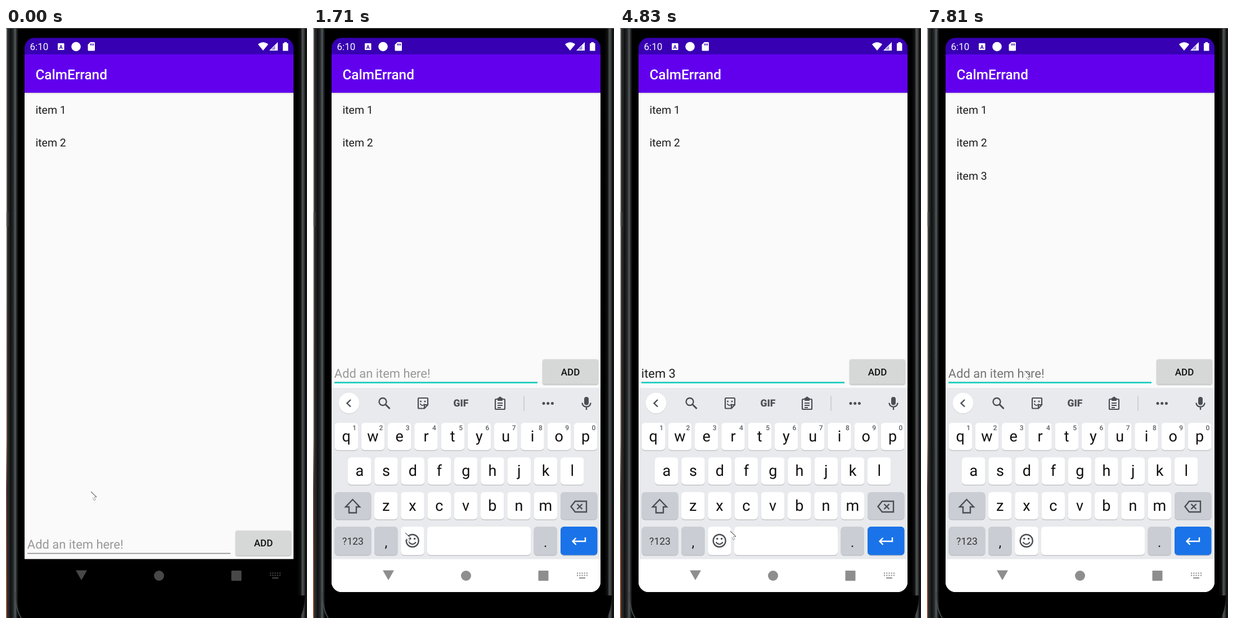
Write an HTML page that moves like this. It is 535 by 1046 pixels and loops after 8000 ms.

```html
<!DOCTYPE html>
<html lang="en">
<head>
<meta charset="utf-8">
<title>To-do list</title>
<style>
  html, body { margin: 0; width: 100%; height: 100%; overflow: hidden; background: #000; }
  svg { display: block; width: 100vw; height: 100vh; font-family: Roboto, sans-serif; }
  text { white-space: pre; text-rendering: geometricPrecision; }
  .mid { text-anchor: middle; }
  .line { fill: none; stroke: #4b4e53; stroke-width: 2.4; }
</style>
</head>
<body>
<svg viewBox="0 0 535 1046">
  <defs>
    <linearGradient id="left">
      <stop offset="0" stop-color="#141516"/><stop offset=".17" stop-color="#2b2e2f"/>
      <stop offset=".26" stop-color="#101112"/><stop offset=".38" stop-color="#1b1d1e"/>
      <stop offset=".48" stop-color="#303435"/><stop offset=".56" stop-color="#555c5e"/>
      <stop offset=".66" stop-color="#202324"/><stop offset=".76" stop-color="#000"/>
    </linearGradient>
    <linearGradient id="right">
      <stop offset="0" stop-color="#000"/><stop offset=".35" stop-color="#111"/>
      <stop offset=".5" stop-color="#4c5051"/><stop offset=".7" stop-color="#3a3d3e"/>
      <stop offset=".82" stop-color="#0c0c0d"/><stop offset="1" stop-color="#1c1c1c"/>
    </linearGradient>
    <linearGradient id="desk" x2="0" y2="1">
      <stop offset="0" stop-color="#a8a6a5"/><stop offset=".35" stop-color="#b9aaa2"/>
      <stop offset=".7" stop-color="#c0a08e"/><stop offset=".78" stop-color="#6d4a3e"/>
      <stop offset="1" stop-color="#a9583a"/>
    </linearGradient>
    <linearGradient id="drop" x2="0" y2="1">
      <stop offset="0" stop-opacity=".1"/><stop offset="1" stop-opacity="0"/>
    </linearGradient>
    <clipPath id="screen"><rect x="33" y="17.500" width="478" height="982.600" rx="18"/></clipPath>
  </defs>

  <rect width="535" height="1046"/>
  <rect width="29" height="1046" fill="url(#left)"/>
  <rect width="2" height="1046" fill="url(#desk)"/>
  <rect x="1.500" y="326" width="3" height="26" rx="1" fill="#3a3c3d"/>
  <rect x="518" width="17" height="1046" fill="url(#right)"/>
  <path d="M21 1000C22 1020 24 1034 33 1046H522C528 1036 531 1022 531 1006H518V1000Z"/>
  <path d="M16 1000C17 1022 20 1036 27 1046" fill="none" stroke="#43484a" stroke-width="2"/>
  <path d="M0 .5H535" stroke="#55585a"/>

  <g clip-path="url(#screen)">
    <rect x="33" y="17" width="478" height="30" fill="#3700b3"/>
    <rect x="33" y="46.700" width="478" height="68.200" fill="#6200ee"/>
    <rect x="33" y="114.850" width="478" height="826.850" fill="#fafafa"/>
    <rect x="33" y="114.850" width="478" height="3.500" fill="url(#drop)"/>
    <g fill="#fff">
      <text x="42.500" y="39" font-size="17">6:10</text>
      <rect x="92" y="27" width="11.500" height="12" rx="1"/>
      <text x="97.700" y="36.500" font-size="9.500" font-weight="700" fill="#3700b3" class="mid">A</text>
      <circle cx="124.500" cy="33" r="8.300"/>
      <path d="M150 25H156.500Q158 25 158 26.500V39Q158 40.500 156.500 40.500H147Q145.500 40.500 145.500 39V29.500Z"/>
      <path d="M150.500 27.500V31M153 27.500V31M155.500 27.500V31" stroke="#3700b3" stroke-width="1.300"/>
      <path d="M457 40L448 29Q457 21.500 466 29Z"/>
      <path d="M483 25V40H468Z"/>
      <path d="M478.500 31V38.500H471Z" fill="#3700b3" opacity=".45"/>
      <path d="M494.500 25H499V27H501.500V40.500H492V27H494.500Z"/>
      <text x="52.470" y="90.700" font-size="24.340" font-weight="500">CalmErrand</text>
    </g>
    <g font-size="19.470" fill="#1d1d1d">
      <text x="52.470" y="152">item 1</text>
      <text x="52.470" y="210.400">item 2</text>
      <text x="52.470" y="268.800" id="added">item 3</text>
    </g>

    <g id="entry">
      <text id="value" y="923"></text>
      <path id="compose" stroke="#222" stroke-width="1.400"/>
      <path d="M38 931.500H399" stroke="#858585" stroke-width="1.300"/>
      <path id="focus" d="M38 932.200H399" stroke="#12d2c3" stroke-width="2.500"/>
      <rect id="caret" y="899.500" width="2.700" height="29" fill="#12d2c3"/>
      <rect id="button" x="408.500" y="891" width="98" height="44" rx="2.500"/>
      <text x="457.500" y="919.400" font-size="17.030" font-weight="500" class="mid" fill="#111">ADD</text>
    </g>

    <g id="board">
      <rect x="33" y="638" width="478" height="370" fill="#e8eaed"/>
      <circle cx="64" cy="666" r="18.500" fill="#cfd1d4"/>
      <circle cx="64" cy="665" r="18.300" fill="#fff"/>
      <path id="chevron" class="line"/>
      <g id="strip">
        <g id="tools" fill="#4b4e53">
          <g class="line">
            <circle cx="124" cy="662.500" r="6.500"/><path d="M129 667.500L136.500 675" stroke-width="3"/>
            <path d="M187 657.500Q187 656 188.500 656H202.500Q204 656 204 657.500V668L198 674.500H188.500Q187 674.500 187 673ZM204 668H198V674.500" stroke-width="2.200"/>
            <path d="M190.500 666Q194 672 198.500 666.500" stroke-width="1.800"/>
            <rect x="324" y="658" width="17" height="18" rx="1.500" stroke-width="2.200"/>
            <path d="M328 665H337M328 669H337M328 673H334" stroke-width="1.800"/>
          </g>
          <circle cx="191.500" cy="662" r="1.500"/><circle cx="199" cy="662" r="1.500"/>
          <rect x="328" y="655.500" width="9" height="5.500" rx="1"/>
          <circle cx="332.500" cy="655.800" r="2.200"/>
          <text x="263" y="671" font-size="17.500" font-weight="900" class="mid">GIF</text>
          <path d="M375 652V679" stroke="#c2c4c8" stroke-width="1.300"/>
          <circle cx="410" cy="665.500" r="2.500"/><circle cx="417.700" cy="665.500" r="2.500"/><circle cx="425.400" cy="665.500" r="2.500"/>
        </g>
        <g id="words" font-size="22" fill="#4b4e53" class="mid">
          <path d="M201.500 651V679M340.500 651V679" stroke="#c2c4c8" stroke-width="1.300"/>
          <text x="139.500" y="674"></text><text x="270.500" y="674"></text><text x="401" y="674"></text>
        </g>
        <rect x="482" y="654" width="8" height="14.500" rx="4" fill="#4b4e53"/>
        <path d="M478.500 664.500C478.500 674 493.500 674 493.500 664.500M486 671.500V677" class="line" stroke-width="2"/>
      </g>
      <g id="keys"></g>
      <g class="line">
        <path d="M70.500 836L83 849H77V859.500H64V849H58Z"/>
        <path d="M466 839H486V858H466L458.500 848.500ZM469.500 844L478.500 853M478.500 844L469.500 853"/>
        <circle cx="176.700" cy="909" r="11"/>
        <path d="M170.500 911.500Q176.700 919 183 911.500" stroke-width="2"/>
        <path d="M484 903V910H462M467.500 904L461.500 910L467.500 916" style="stroke:#fff"/>
      </g>
      <circle cx="172.800" cy="905.500" r="1.800" fill="#4b4e53"/><circle cx="180.600" cy="905.500" r="1.800" fill="#4b4e53"/>
    </g>

    <rect id="navbar" x="33" y="941.700" width="478" height="59"/>
    <g id="nav">
      <path d="M124 961.500H144L134 979Z"/>
      <circle cx="272" cy="971" r="9"/>
      <rect x="400.500" y="962" width="18" height="18" rx="1"/>
      <path d="M469 966.500H488M469 970.500H488" stroke-width="2.200" stroke-dasharray="2.200 2"/>
      <path d="M473 975H484" stroke-width="2.200"/>
    </g>
  </g>

  <g id="pointer">
    <path d="M0 0V13L3 10.500L5.500 15.500L8 14.300L5.800 9.700H10Z" fill="#fcfcfc"/>
    <path d="M0 0L10 9.700" stroke="#222" fill="none"/>
    <path d="M9 9.700H5.800L8 14.300L5.500 15.500L3 11" stroke="#333" stroke-dasharray="1 1.200" fill="none"/>
  </g>
</svg>

<script>
const LOOP = 8000, LIFT = -303.4, HINT = 'Add an item here!', LEFT = 37.87, SIZE = 21.9;
const $ = id => document.getElementById(id);
const set = (el, attrs) => { for (const k in attrs) el.setAttribute(k, attrs[k]); };
const show = (el, on) => set(el, { visibility: on ? 'visible' : 'hidden' });

function add(tag, attrs, text = '') {
  const el = document.createElementNS('http://www.w3.org/2000/svg', tag);
  set(el, attrs);
  el.textContent = text;
  return $('keys').appendChild(el);
}

function key(x, y, w, fill, label, size = 27, base = 33, ink = '#111') {
  const h = y > 880 ? 50.5 : 48.5;
  add('rect', { x, y: y + 1.3, width: w, height: h, rx: 6, fill: '#b9bbbf' });
  add('rect', { x, y, width: w, height: h, rx: 6, fill });
  if (label) add('text', { x: x + w / 2, y: y + base, 'font-size': size, fill: ink, class: 'mid' }, label);
}

const PITCH = 47.25, GREY = '#cacdd3', WHITE = '#fff';
[['qwertyuiop', 38.5, 700], ['asdfghjkl', 62, 761.3], ['zxcvbnm', 109, 822.7]].forEach(([row, x0, y], r) =>
  [...row].forEach((c, i) => {
    key(x0 + i * PITCH, y, 41.5, WHITE, c);
    if (!r) add('text', { x: x0 + i * PITCH + 38.5, y: 713, 'font-size': 12, 'font-weight': 500, fill: '#5c5f64', 'text-anchor': 'end' }, (i + 1) % 10);
  }));
key(38.5, 822.7, 65, GREY);
key(440, 822.7, 65.5, GREY);
key(38.5, 884, 65, GREY, '?123', 17.5, 32, '#333');
key(109, 884, 41.5, GREY, ',', 24, 36);
key(156.2, 884, 41.5, WHITE);
key(203, 884, 184, WHITE);
key(392.5, 884, 41.5, GREY, '.', 24, 36);
key(440, 884, 65.5, '#1a73e8');

// Each step changes part of the state; everything holds until the next one.
const steps = [
  [0, { at: [151, 822], text: '', caret: 0, focus: 0, up: 0, fade: 0, drop: 0, words: null, compose: 0, pressed: 0, added: 0, hint: '#989898' }],
  [120, { at: [169, 893] }],
  [400, { at: [166, 894] }],
  [520, { at: [164, 895] }],
  [920, { focus: .5 }],
  [1040, { focus: 1, caret: 1 }],
  [1440, { up: 1, fade: .45, drop: 225 }],
  [1560, { fade: .74, drop: 115.5 }],
  [1710, { fade: 1, drop: 0, caret: 0 }],
  [1990, { caret: 1 }],
  [2260, { text: 'i', compose: 1 }],
  [2380, { words: ['I', 'in', 'is'] }],
  [2660, { text: 'it', words: ["it's", 'it', 'its'] }],
  [2970, { text: 'ite' }],
  [3090, { text: 'item' }],
  [3210, { words: ['items', 'item', 'its'] }],
  [3360, { text: 'item ' }],
  [3480, { words: ['in', 'is', 'from'] }],
  [3760, { compose: 0, words: ['2', 'is', 'for'] }],
  [4290, { caret: 0 }],
  [4410, { text: 'item 3', caret: 1 }],
  [4560, { words: null }],
  [4830, { at: [196, 892], caret: 0 }],
  [4950, { at: [244, 882] }],
  [5100, { at: [300, 800] }],
  [5220, { at: [374, 690] }],
  [5340, { at: [423, 608], caret: 1 }],
  [5590, { at: [522, 602] }],
  [5710, { at: [498, 594] }],
  [5830, { at: [480, 597], caret: 0 }],
  [6230, { pressed: 1 }],
  [6350, { text: '', caret: 1 }],
  [6500, { pressed: 0, added: 1 }],
  [6750, { caret: 0 }],
  [7020, { at: [420, 609] }],
  [7140, { at: [312, 630] }],
  [7260, { at: [223, 640], caret: 1 }],
  [7410, { at: [174, 608] }],
  [7810, { caret: 0, hint: '#747474' }]
];

const ADVANCE = { i: .243, t: .327, e: .53, m: .876, ' ': .2475, 3: .562 };
const endOf = s => [...s].reduce((x, c) => x + ADVANCE[c] * SIZE, LEFT);

function render(t) {
  const s = Object.assign({}, ...steps.filter(([from]) => from <= t).map(([, change]) => change));
  const open = s.fade === 1;

  set($('entry'), { transform: `translate(0 ${s.up * LIFT})` });
  $('value').textContent = s.text || HINT;
  set($('value'), { x: LEFT, 'font-size': SIZE, fill: s.text ? '#1d1d1d' : s.hint });
  set($('compose'), { d: `M38 925.700H${endOf(s.text.trim())}` });
  show($('compose'), s.compose);
  set($('focus'), { opacity: s.focus });
  set($('caret'), { x: endOf(s.text) });
  show($('caret'), s.caret);
  set($('button'), { fill: s.pressed ? '#bfc0c0' : '#d6d8d7' });
  $('button').style.filter = `drop-shadow(0 ${s.pressed ? 2.5 : 1.2}px ${s.pressed ? 2 : 1.2}px rgba(0,0,0,.35))`;
  show($('added'), s.added);

  set($('board'), { transform: `translate(0 ${s.drop})`, opacity: s.fade });
  set($('strip'), { opacity: s.fade });
  show($('tools'), !s.words);
  show($('words'), s.words);
  $('words').querySelectorAll('text').forEach((el, i) => { el.textContent = s.words ? s.words[i] : ''; });
  set($('chevron'), { d: s.words ? 'M60.500 659L67 665.300L60.500 671.500' : 'M67 659L60.500 665.300L67 671.500' });

  set($('navbar'), open ? { fill: '#fff', opacity: 1 } : { fill: '#000', opacity: s.up ? .15 : 1 });
  const ink = open ? '#8e8e8e' : s.up ? '#646464' : '#484848';
  set($('nav'), { fill: ink, stroke: ink, 'stroke-width': 0 });
  set($('pointer'), { transform: `translate(${s.at})` });
}

const start = performance.now();
function tick() {
  render((performance.now() - start) % LOOP);
  requestAnimationFrame(tick);
}
tick();
</script>
</body>
</html>
```
